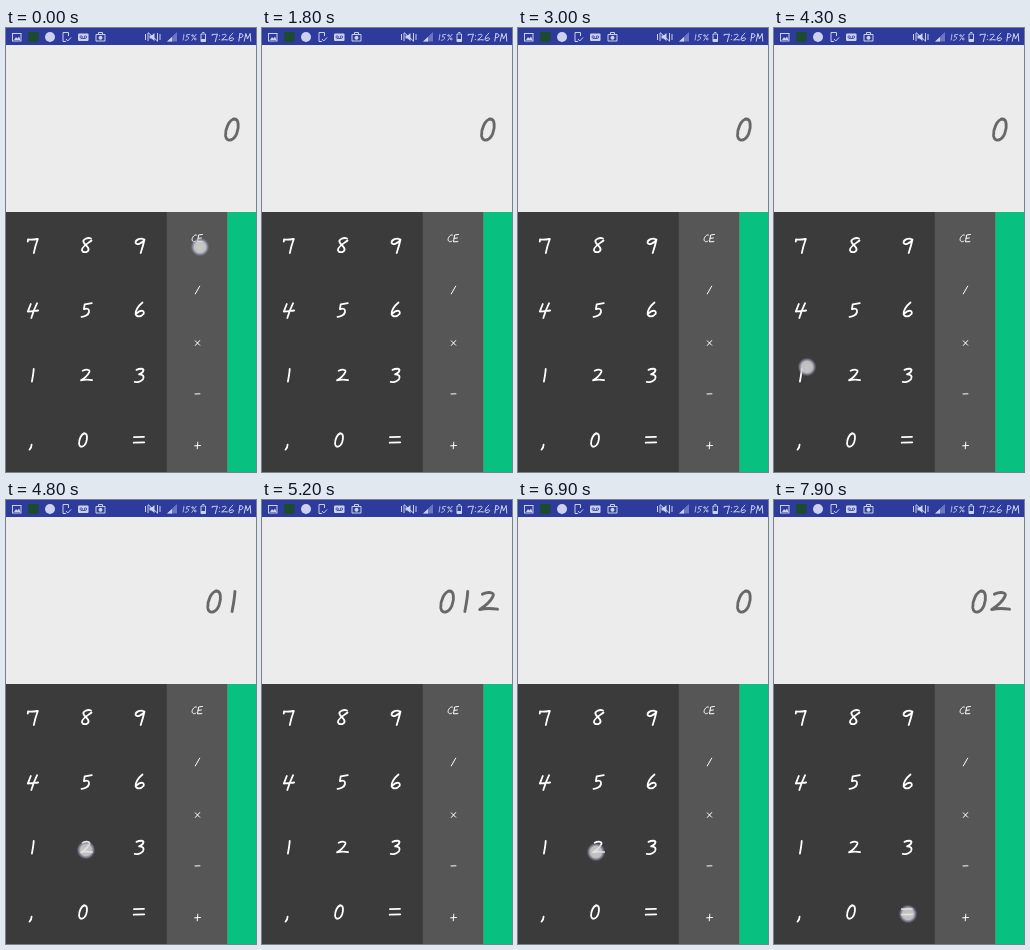
These frames come from a looping animation (250 by 444 pixels, 8000 ms). An HTML page:

```html
<!DOCTYPE html>
<html lang="en">
<head>
<meta charset="utf-8">
<title>Calculator</title>
<style>
  html, body { margin: 0; width: 100%; height: 100%; overflow: hidden; }
  svg { display: block; width: 100%; height: 100%; }
  .pen { fill: none; stroke: #fff; stroke-width: 1.8; stroke-linecap: round; stroke-linejoin: round; }
  .icon { fill: none; stroke: #ccd2ee; stroke-width: 1; }
  .solid { fill: #ccd2ee; stroke: none; }
  #status { stroke: #d4d9f2; }
  #display { stroke: #686868; }
</style>
</head>
<body>
<svg viewBox="0 0 250 444" role="img" aria-label="Calculator">
  <defs>
    <radialGradient id="glow">
      <stop offset="0" stop-color="#dedede" stop-opacity=".85"/>
      <stop offset=".6" stop-color="#d4d4d6" stop-opacity=".85"/>
      <stop offset=".78" stop-color="#b0b0cc" stop-opacity=".55"/>
      <stop offset="1" stop-color="#8080b0" stop-opacity="0"/>
    </radialGradient>
  </defs>
  <rect width="250" height="444" fill="#ececec"/>
  <rect width="250" height="17" fill="#2c3b9c"/>
  <rect y="184" width="161" height="260" fill="#3b3b3b"/>
  <rect x="160.800" y="184" width="61" height="260" fill="#565656"/>
  <rect x="221.500" y="184" width="28.500" height="260" fill="#08c180"/>

  <g class="icon">
    <rect x="6.500" y="5.500" width="8.500" height="7.500"/>
    <path class="solid" d="M8 12l2-3 1.500 1.500 1.500-2 1.500 3.500z"/>
    <rect x="22" y="4" width="10.500" height="10" style="fill:#1d4a30;stroke:none"/>
    <circle class="solid" cx="44" cy="9" r="5"/>
    <path d="M62.500 8V4.500h-5.500v9h3M60 11l1.700 2 3.300-3.500"/>
    <rect class="solid" x="72" y="5.500" width="10.500" height="7.500" rx="1"/>
    <path d="M74 9a1.200 1.200 0 1 0 2.400 0a1.200 1.200 0 1 0-2.400 0M78.200 9a1.200 1.200 0 1 0 2.400 0a1.200 1.200 0 1 0-2.400 0M75 10.500h4.500" style="stroke:#2c3b9c;stroke-width:.8"/>
    <path d="M92.500 6.500v-2h4v2M90 6.500h9v6.500h-9z"/>
    <circle class="solid" cx="94.500" cy="9.700" r="2"/>
    <path d="M139.500 6v6M142 5v8M154 6v6M151.500 5v8M142 4.500l10 9"/>
    <path class="solid" d="M143.500 7.500h2l3-2.500v8l-3-2.500h-2z"/>
    <path d="M171 4v9.500h-10z" style="fill:#6a76be;stroke:none"/>
    <path class="solid" d="M166 9v4.500h-5z"/>
    <path d="M195 6h4.500v7.500H195zM196.300 4.500h2"/>
    <path class="solid" d="M195 11h4.500v2.500H195z"/>
  </g>

  <g id="status" class="pen"></g>
  <g id="keys" class="pen"></g>
  <g id="display" class="pen"></g>
  <circle id="touch" r="9.500" fill="url(#glow)"/>
</svg>
<script>
// Handwritten pen strokes, each centred on its own origin.
const glyphs = {
  0: 'M1.500-6.500C-2-6.500-4.600 0-4.200 4C-3.600 8.300 1 7 2.800 2.500C4.300-1.500 4.300-7.300 .5-6.500',
  1: 'M.9-6.300C.7-2-.1 2-.9 6.200',
  2: 'M-3.800-4.600C0-6.300 4-5.800 2.800-3.200C1.500-.5-2 2.800-5.500 5C-2 4.200 2 4.300 5.600 4.800',
  3: 'M-3.500-5.500C0-7 4-7 3.500-5C3-3 1-1.500-1-1C3-1 4.500 1 3 4C1 6.500-3 7-5.300 6.500',
  4: 'M-2-6L-5 1.500C-1 1.500 2 .8 5.300 .5M4.300-6.800C2-2 0 3-1.500 8',
  5: 'M5.300-6.800L-1.800-5.600L-2.600-.8C1-2 3-1 2.500 2C2 5-2 7-5 6.800',
  6: 'M2.500-7.500C-2-4-4.800 1-4.400 4C-3.500 7.500 1 7 3.500 4C5 1 1-1-3 3',
  7: 'M-5-3.300L-4.800-5.500C-2-5 2-5.500 5-6C3.500-2 2 3 1 8',
  8: 'M4.500-6.500C1-8-4-5.500-3-3C-2 0 3 2 2 5C1 8-5 8-4.500 4.500C-4 1 2-2 5-4.500',
  9: 'M4-5.300C1-8-4.500-5-4.500-2.500C-4 .5 2-1 4.500-5.500C3.500-1 2 4 .7 8',
  ',': 'M.8-2.200C.8 0 0 1.500-1.300 2.800',
  '=': 'M-5-2.800L5-3.200M-5.300 2.600L5.300 2.300',
  C: 'M4-6C1-8-4-2-4 2C-4 7 1 7 3 5',
  E: 'M5-7L-2-6L-4 6.500L4 6M-3 0L3-.5',
  P: 'M-2-7L-4 7M-2-6.500C6-8 6 1-3 1',
  M: 'M-6 7L-3-7L0 3L5-7L6 7',
  ':': 'M.5-3v.5M0 4v.5',
  '%': 'M5-7L-5 7M-5-4a2 2 0 1 0 4 0a2 2 0 1 0-4 0M1 4a2 2 0 1 0 4 0a2 2 0 1 0-4 0',
  '/': 'M4-7L-4 7',
  x: 'M-4-4L4 4M4-4.500L-4 4.500',
  '-': 'M-4.500 0L4.500-.4',
  '+': 'M-5.300 .5L5.300 0M.5-6L-.5 6'
};
const glyph = (char, x, y, scale = 1) =>
  `<path d="${glyphs[char]}" transform="translate(${x} ${y}) scale(${scale})"/>`;
const row = (text, xs, y, scale) =>
  [...text].map((char, i) => glyph(char, xs[i], y, scale)).join('');
const column = (text, x, ys, scale) =>
  [...text].map((char, i) => glyph(char, x, ys[i], scale)).join('');

const $ = id => document.getElementById(id);
const columns = [26.800, 80.500, 134];
$('keys').innerHTML =
  row('789', columns, 217) + row('456', columns, 282) +
  row('123', columns, 347.300) + row(',0=', [24.800, 77.300, 133], 412) .replace('24.8 412', '24.8 418.8') +
  row('CE', [188.300, 193.700], 210.300, .55) +
  column('/x-+', 191.500, [262, 315, 366, 417.500], .55);
$('status').innerHTML =
  row('15%', [177.500, 181.500, 188], 9.300, .44) +
  row('7:26PM', [208.800, 213.300, 218.500, 225.500, 235, 241.500], 9.300, .54);

const layouts = { '0': [226.300], '01': [208.500, 227.500], '012': [185.500, 204.300, 226.500], '02': [205.500, 226.500] };
const values = [[0, '0'], [4600, '01'], [5000, '012'], [5900, '0'], [7200, '02']];
// Taps: start, end, x, y
const taps = [
  [0, 300, 194, 219], [1900, 2200, 190, 215], [2500, 2900, 185, 214],
  [4300, 4700, 33, 339], [4700, 5100, 80, 350], [5600, 6100, 190, 215],
  [6900, 7300, 78, 352], [7900, 8100, 134, 414]
];

let shown;
function draw(now) {
  const time = Math.floor(now % 8000 / 100) * 100;
  const value = values.filter(([start]) => start <= time).pop()[1];
  if (value !== shown) {
    $('display').innerHTML = row(value, layouts[value], 101.500, 1.6);
    shown = value;
  }
  const tap = taps.find(([start, end]) => time >= start && time < end);
  const touch = $('touch');
  touch.style.opacity = !tap ? 0 : tap[1] - time > 100 ? 1 : .5;
  if (tap) {
    touch.setAttribute('cx', tap[2]);
    touch.setAttribute('cy', tap[3]);
  }
  requestAnimationFrame(draw);
}
draw(performance.now());
</script>
</body>
</html>
```
